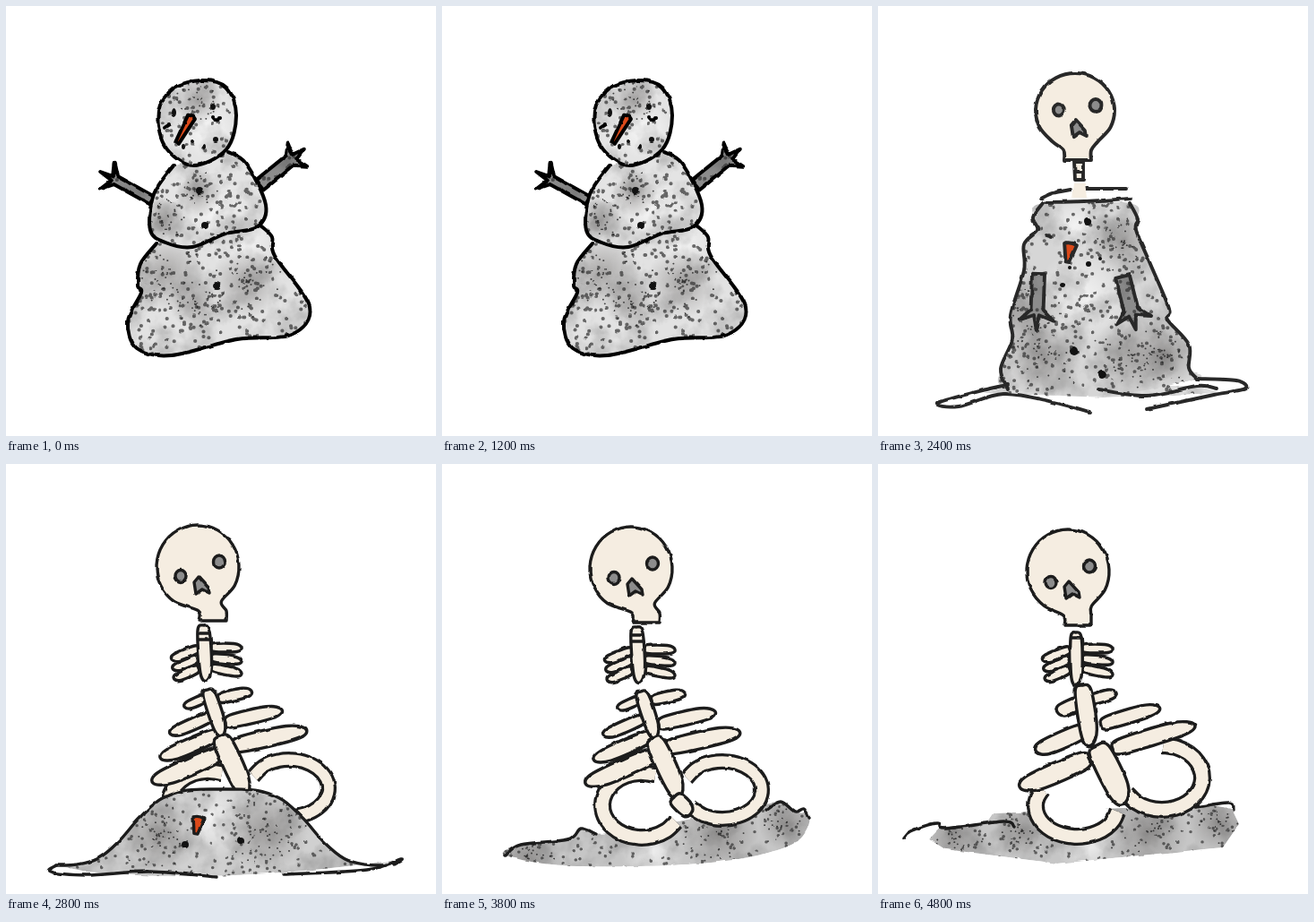
Recreate the animation shown at these times as an HTML page. Size 480 px wide and 480 px high, loop 5000 ms.

```html
<!DOCTYPE html>
<html lang="en">
<head>
<meta charset="utf-8">
<title>Melting snowman</title>
<style>
  html, body { margin: 0; width: 100%; height: 100%; overflow: hidden; background: #fff; }
  svg { display: block; width: 100vw; height: 100vh; }
</style>
</head>
<body>
<svg viewBox="0 0 480 480" stroke-linecap="round" stroke-linejoin="round" fill="none">
  <defs>
    <filter id="rough" filterUnits="userSpaceOnUse" x="0" y="0" width="480" height="480" color-interpolation-filters="sRGB">
      <feTurbulence type="fractalNoise" baseFrequency=".08" numOctaves="2" seed="4"/>
      <feColorMatrix values="1 0 0 0 0  0 1 0 0 0  0 0 1 0 0  0 0 0 0 1" result="noise"/>
      <feDisplacementMap in="SourceGraphic" in2="noise" scale="3" xChannelSelector="R" yChannelSelector="G"/>
    </filter>
    <filter id="mottle" x="0" y="0" width="1" height="1" color-interpolation-filters="sRGB">
      <feTurbulence type="fractalNoise" baseFrequency=".03" numOctaves="4" seed="9"/>
      <feColorMatrix values="0 0 0 0 .2  0 0 0 0 .2  0 0 0 0 .2  .6 0 0 0 -.25"/>
    </filter>
    <radialGradient id="smudge">
      <stop offset="0" stop-color="#4a4644"/>
      <stop offset="1" stop-color="#4a4644" stop-opacity="0"/>
    </radialGradient>
    <radialGradient id="glow">
      <stop offset="0" stop-color="#fff"/>
      <stop offset="1" stop-color="#fff" stop-opacity="0"/>
    </radialGradient>
    <g id="grain">
      <rect width="480" height="480" fill="#000" filter="url(#mottle)"/>
      <path id="specks" stroke="#333" opacity=".7"/>
    </g>
  </defs>
  <g id="stage" filter="url(#rough)"></g>
</svg>
<script>
const BONE = '#f5ede1', GREY = '#8c8c8c', CARROT = '#dc4a1a', RAD = Math.PI / 180;

let seed = 7;
const rnd = () => (seed = (seed * 16807) % 2147483647) / 2147483647;
const speckles = (n, place) => Array.from({ length: n }, () => {
  const [x, y] = place();
  return `M${x.toFixed(1)} ${y.toFixed(1)}h.2`;
}).join('');
const polar = (x, y, r, deg, ry = r) => [x + r * Math.cos(deg * RAD), y + ry * Math.sin(deg * RAD)];
const mix = (a, b, t) => a + (b - a) * t;

// Catmull-Rom spline through points, given as text or as pairs
function spline(pts, closed) {
  const p = typeof pts === 'string' ? pts.split(' ').map(q => q.split(',').map(Number)) : pts, n = p.length;
  const at = i => closed ? p[(i + n) % n] : p[Math.max(0, Math.min(n - 1, i))];
  let d = 'M' + p[0];
  for (let i = 0; i < (closed ? n : n - 1); i++) {
    const [a, b, c, e] = [at(i - 1), at(i), at(i + 1), at(i + 2)];
    d += `C${b.map((v, k) => v + (c[k] - a[k]) / 6)} ${c.map((v, k) => v - (e[k] - b[k]) / 6)} ${c}`;
  }
  return d + (closed ? 'Z' : '');
}

const group = (body, attrs) => `<g ${attrs}>${body}</g>`;
const move = (body, t) => group(body, `transform="${t}"`);
const ink = (body, color, width) => group(body, `stroke="${color}" stroke-width="${width}"`);
const path = (d, fill = 'none') => `<path d="${d}" fill="${fill}"/>`;
const shape = (pts, fill) => path(spline(pts, true), fill);
const lines = (...list) => list.map(pts => path(spline(pts))).join('');
const dot = (x, y, rx = 4, ry = rx, fill = '#111') => `<ellipse cx="${x}" cy="${y}" rx="${rx}" ry="${ry}" fill="${fill}"/>`;
const dots = (...list) => group(list.map(d => dot(...d)).join(''), 'stroke="none"');

// Speckled snow inside an outline; smudges and glows are [x, y, radius]
let clips = 0;
function snow(d, tone, smudges = [], glows = []) {
  const id = 'clip' + clips++;
  const disc = (fill, k) => ([x, y, r]) => `<circle cx="${x}" cy="${y}" r="${r}" fill="url(#${fill})" opacity="${k}"/>`;
  const dirt = smudges.map(([x, y, r]) => speckles(r, () => polar(x, y, rnd() * r, rnd() * 360))).join('');
  return `<clipPath id="${id}">${path(d)}</clipPath>` + group(
    path(d, tone) + glows.map(disc('glow', .7)).join('') + smudges.map(disc('smudge', .38)).join('') +
    `<use href="#grain"/><path d="${dirt}" stroke="#222" stroke-width="1.8" opacity=".8"/>`,
    `clip-path="url(#${id})" stroke="none"`);
}

// A stick that ends in three pointed twigs
function arm(x, y, deg, length, twig, half = 5, tone = GREY) {
  const [hx, hy] = polar(x, y, length, deg);
  const pts = [polar(x, y, half, deg - 90), polar(hx, hy, half, deg - 90)];
  for (const turn of [-58, 0, 58])
    pts.push(polar(hx, hy, twig, deg + turn), polar(hx, hy, half, deg + turn + 29));
  pts.splice(-1, 1, polar(hx, hy, half, deg + 90), polar(x, y, half, deg + 90));
  const d = 'M' + pts.join('L') + 'Z';
  return snow(d, tone) + path(d);
}

const carrot = (x, y, deg, length, width) =>
  move(path(`M0 ${-width / 2}Q-3 0 0 ${width / 2}L${length} 2V-2Z`, CARROT), `translate(${x} ${y}) rotate(${deg})`);

// --- Snowman ---
function head() {
  const d = spline('187,92 218,83 246,91 257,122 246,160 208,178 177,156 170,118', true);
  return snow(d, '#e4e4e4', [[215, 105, 26]], [[225, 140, 30]]) + path(d) + carrot(207, 124, 119, 33, 9) +
    dots([187, 119, 3, 5], [231, 112, 3, 4], [198, 157, 2, 3], [208, 151, 2], [222, 157, 2, 3], [234, 149, 3]) +
    lines('177,136 183,132', '231,124 235,128 238,125');
}

function snowman() {
  const base = spline('168,265 150,288 147,312 151,320 136,352 146,382 185,390 258,372 318,367 339,336 300,279 297,258 284,245');
  const belly = spline('187,178 165,210 161,250 178,264 208,269 245,254 280,247 290,222 268,176 248,163');
  return arm(163, 217, 209, 46, 20) + arm(283, 200, -39, 44, 20, 7) +
    snow(base, '#e2e2e2', [[180, 298, 42], [268, 308, 40], [210, 332, 28]], [[262, 264, 36]]) + path(base) +
    snow(belly, '#e4e4e4', [[215, 210, 26], [174, 240, 26]], [[235, 225, 34]]) + path(belly) +
    head() + dots([216, 206], [222, 245], [235, 312]);
}

// --- Sagging body ---
function sagging() {
  const d = spline('192,170 180,192 157,218 158,262 143,322 120,370 103,409 110,428 155,437 240,428 330,416 356,419 358,393 335,375 328,348 298,305 294,245 281,212 272,185 256,170');
  return snow(d, '#d9d9d9', [[180, 312, 48], [265, 322, 46], [180, 215, 34], [345, 398, 28]], [[245, 270, 44], [220, 385, 50]]) + path(d) +
    lines('180,191 188,190 194,194', '160,262 170,276 179,280', '141,318 148,321', '278,207 287,212', '177,345 177,360 182,352') +
    arm(157, 230, 182, 30, 18, 8, '#666') + arm(275, 257, 38, 44, 18, 7, '#666') + dots([222, 240, 5], [223, 292, 5], [233, 372, 5]);
}

function masked() {
  const scarf = spline('180,133 214,137 264,126 267,145 236,170 200,170 178,154', true);
  return sagging() + move(skull(224, 121, 36, 40, 224, 152, -6), 'rotate(-12 224 121)') +
    snow(scarf, '#c2c2c2', [[240, 145, 34]]) + path(scarf) +
    carrot(212, 151, 108, 20, 10) + dots([242, 139, 3], [222, 157, 2]);
}

const slumped = () => move(sagging(), 'translate(22 14) scale(.92 .95)') + move(head(), 'translate(5 1)');

// --- Collapsing heap ---
const relics = () => arm(179, 299, 92, 40, 23, 7) + arm(273, 302, 76, 38, 23, 8) + carrot(215, 266, 100, 20, 14) +
  lines('188,256 194,258') + dots([234, 241], [206, 311, 3], [235, 288, 3], [214, 292, 2], [248, 282, 2], [219, 385, 5], [250, 411, 5]);

function heap() {
  const left = '184,220 173,236 178,250 163,266 163,295 148,345 150,372 137,405 145,427';
  const right = '281,220 290,238 288,250 304,288 325,338 323,350 347,378 347,404 356,416';
  const body = spline(`${left} 250,435 ${right.split(' ').reverse().join(' ')}`, true);
  return snow('M118 432L146 424H356L384 432L250 437Z', '#ddd') +
    snow(body, '#d6d6d6', [[165, 345, 42], [185, 395, 42], [285, 390, 46], [275, 265, 34], [325, 390, 34]], [[230, 325, 54], [220, 245, 34]]) +
    lines(left, right, '145,423 125,427 67,443 90,447 140,433 195,442 236,453', '356,416 400,418 410,427 375,434 300,450',
      '246,428 300,435 356,424 378,427', '182,215 195,209 215,205', '232,204 277,204', '187,219 230,218 282,215') + relics() +
    group(path('M219 198h12l2 16h-16z', BONE), 'stroke="none"') + path('M219 174h10v20h-9zM220 185h9', BONE) +
    skull(220, 117, 44, 42, 223, 172, -1);
}

// --- Skeleton ---
function skull(x, y, rx, ry, jaw, chin, droop) {
  const pts = [[jaw - 15, chin], [jaw - 16, chin - 11]];
  for (let a = 125; a <= 415; a += 29) pts.push(polar(x, y, rx, a, ry));
  pts.push([jaw + 15, chin - 11], [jaw + 15, chin]);
  const k = rx / 46;
  return path(spline(pts) + 'Z', BONE) + dot(x - 19 * k, y + droop, 6, 6.5, GREY) + dot(x + 24 * k, y - 6, 6.5, 7, GREY) +
    move(path('M-8 -4L-3 -10L8 2L9 8L1 4L-6 9Z', GREY), `translate(${x + 4 * k} ${y + 21 * k})`);
}

// A long bone with blunt tapered ends
function bone(x1, y1, x2, y2, w) {
  const deg = Math.atan2(y2 - y1, x2 - x1) / RAD;
  const side = (t, s) => polar(mix(x1, x2, t), mix(y1, y2, t), w / 2, deg + 90 * s);
  return shape([[x1, y1], side(.1, -1), side(.75, -1), [x2, y2], side(.85, 1), side(.1, 1)], BONE);
}

// Ribs spread along a stretch of spine, longer and thicker towards the bottom
function fan(from, to, n, short, long, deg, w) {
  let out = '';
  for (let i = 0; i < n; i++) {
    const t = i / (n - 1), x = mix(from[0], to[0], t), y = mix(from[1], to[1], t);
    out += bone(x, y, ...polar(x, y, mix(short, long, t ** .8), deg), w + 3 * i);
  }
  return out;
}

function ring(x, y, rx, ry, from, to, w) {
  const d = spline(Array.from({ length: 13 }, (_, i) => polar(x, y, rx, mix(from, to, i / 12), ry)));
  return group(path(d, '#fff') + `<path d="${d}" stroke="${BONE}" stroke-width="${w - 6.5}"/>`, `stroke-width="${w}" stroke-linecap="butt"`);
}

const neckRibs = () => [0, 11, 22].map(v =>
  bone(212, 208 + v, 182 + v / 8, 220 + v, 9) + bone(226, 207 + v, 260, 207 + v * 1.3, 9)).join('');

const sitting = () =>
  ring(223, 381, 44, 36, -70, -330, 20) + ring(313, 364, 44, 32, 205, 500, 18) + neckRibs() +
  fan([222, 262], [238, 324], 4, 28, 84, 156, 9) + fan([234, 264], [250, 317], 3, 38, 84, -13, 11) +
  bone(217, 182, 221, 244, 13) + lines('212,191 224,191', '212,198 225,198') +
  bone(222, 254, 239, 305, 14) + bone(236, 306, 266, 371, 20) + bone(259, 372, 278, 390, 16) +
  skull(211, 117, 46, 47, 228, 177, 10);

const leaning = () =>
  ring(222, 382, 46, 34, 212, 10, 20) + ring(317, 350, 45, 36, -88, 150, 20) + move(neckRibs(), 'translate(2 -1)') +
  fan([226, 266], [236, 328], 3, 28, 84, 156, 14) + fan([236, 264], [262, 318], 3, 31, 95, -17, 11) +
  bone(221, 188, 222, 247, 12) + lines('216,194 227,194') + bone(228, 247, 238, 314, 18) + bone(244, 314, 276, 378, 24) +
  skull(212, 120, 46, 47, 223, 180, 12);

// --- Slush around the skeleton ---
const slush = () =>
  snow(spline('71,437 88,425 141,419 155,408 185,412 300,392 375,377 394,388 411,394 390,425 300,445 150,449', true),
    '#c6c6c6', [[95, 438, 34], [310, 412, 44], [385, 400, 32]], [[235, 432, 36]]) +
  lines('71,437 88,425 141,419 155,407 172,413', '362,386 378,377 394,388 404,385 410,395');

const slab = (...edges) =>
  snow('M57 419L70 405L120 402L128 390L370 380L395 385L403 402L385 428L200 446L75 430Z',
    '#c6c6c6', [[85, 418, 34], [160, 410, 30], [300, 410, 46], [380, 400, 34]], [[235, 425, 36]]) + lines(...edges);

// A bell-shaped heap that runs out into a flat puddle
function mound(height, spread, right) {
  const pts = [];
  for (let x = 56; x <= right - 8; x += 23) pts.push([x, 448 - height * Math.exp(-(((x - 240) / spread) ** 4))]);
  const top = spline(pts);
  return snow(top + `L${right - 8} 442Q240 470 90 455Z`, '#d0d0d0', [[170, 415, 44], [290, 410, 48]], [[228, 395, 44]]) + path(top) +
    lines('56,448 49,455 90,459 160,455 235,461', `${right - 10},447 ${right - 2},441 ${right - 40},453 310,458`) +
    carrot(215, 395, 100, 18, 12) + dots([200, 425], [262, 420]);
}

// --- Poses in order of appearance ---
const man = t => ink(move(snowman(), t), '#000', 4);
const thin = body => ink(body, '#1c1c1c', 3.4);
const poses = {
  A: man(''),
  B: man('translate(-37.9 -34.4) scale(1.132 1.139)'),
  C: man('translate(-3.2 -3.5) scale(1.033 1.055)'),
  D: ink(slumped(), '#222', 4),
  E: ink(masked(), '#3a3a3a', 3.8),
  F: ink(move(heap(), 'translate(4.5 5) scale(1.023 .987)'), '#2a2a2a', 3.9),
  G: ink(heap(), '#282828', 3.9),
  H: thin(move(sitting(), 'translate(4 -3)') + mound(145, 90, 425)),
  I: thin(move(sitting(), 'translate(3 -2)') + mound(85, 110, 443)),
  J: thin(move(slush(), 'translate(-39 -47) scale(1.162 1.123)') + move(sitting(), 'translate(-5 -13) scale(1.02 1.06)')),
  K: thin(slush() + sitting()),
  L: thin(slab('21,424 40,414 85,409 130,403 150,408', '360,386 380,381 416,392') + move(sitting(), 'translate(2 1) rotate(.8 240 420)')),
  M: thin(slab('28,418 36,410 65,401 75,407 140,399 152,405', '355,383 392,378 397,386') + leaning())
};
const order = 'ABC'.repeat(3) + 'DEFGHIJ' + 'KLM'.repeat(3);
const STEP = 200;

document.getElementById('specks').setAttribute('d', speckles(2000, () => [rnd() * 480, rnd() * 480]));
document.getElementById('stage').innerHTML =
  Object.keys(poses).map(k => group(poses[k], `id="${k}" display="none"`)).join('');

let shown;
function draw(now) {
  const next = document.getElementById(order[Math.floor(now / STEP) % order.length]);
  if (next === shown) return;
  if (shown) shown.setAttribute('display', 'none');
  next.setAttribute('display', 'inline');
  shown = next;
}

const start = performance.now();
function tick() {
  draw(performance.now() - start);
  requestAnimationFrame(tick);
}
tick();
</script>
</body>
</html>
```
